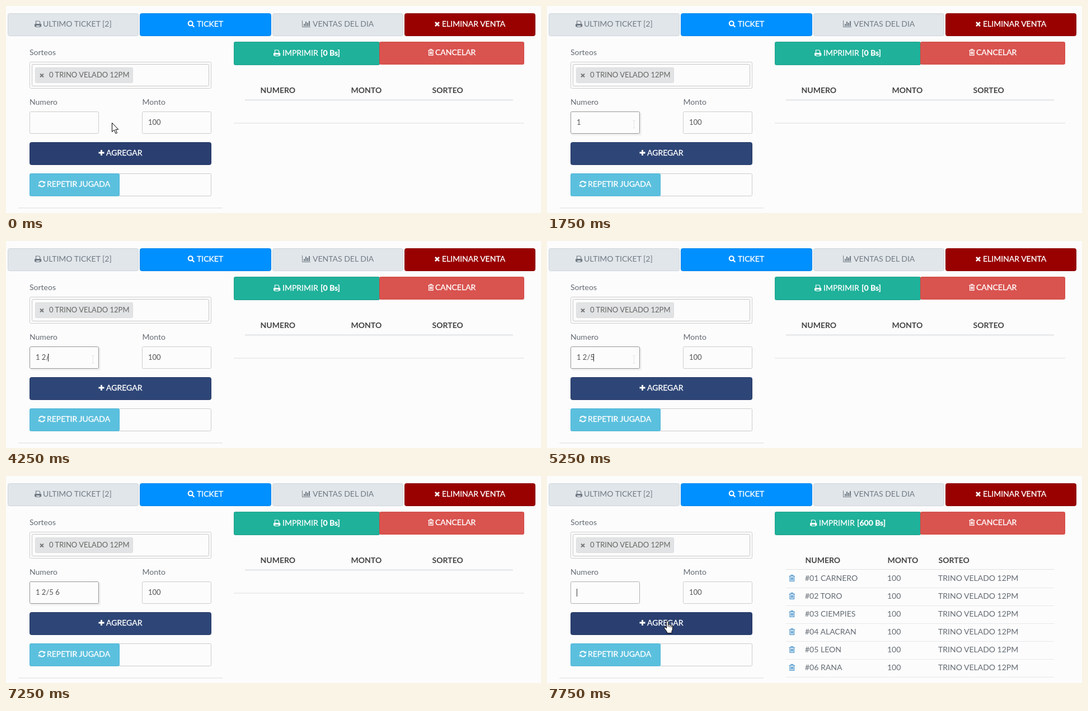
These frames come from a looping animation (956x371 px, 8000 ms). An HTML page:

```html
<!DOCTYPE html>
<html lang="es">
<head>
<meta charset="utf-8">
<title>Ventas</title>
<style>
html, body { margin: 0; height: 100%; overflow: hidden; background: #fcfcfc; }
svg { display: block; width: 100vw; height: 100vh; }
text { font: 14px Lato, sans-serif; white-space: pre; }
.b { font-weight: 700; }
.s { font-size: 13px; }
.w { fill: #fff; stroke: #fff; stroke-width: .3px; }
</style>
</head>
<body>
<svg id="stage" viewBox="0 0 956 371"></svg>
<script>
const DRAW = 'TRINO VELADO 12PM';
const GREY = '#717b85', INK = '#646b73', LINE = '#e6e8ea';

const text = (x, y, s, fill, cls = '') => `<text x="${x}" y="${y}" fill="${fill}" class="${cls}">${s}</text>`;
const white = (x, y, s, cls = '') => text(x, y, s, '#fff', 'w ' + cls);
const box = (x, y, w, h, fill, stroke, r = 3, id = '') =>
  `<rect id="${id}" x="${x + .5}" y="${y + .5}" width="${w - 1}" height="${h - 1}" rx="${r}" fill="${fill}" stroke="${stroke}"/>`;
const bar = (x, y, w, h, fill) => `<rect x="${x}" y="${y}" width="${w}" height="${h}" fill="${fill}"/>`;
const group = (id, body) => `<g id="${id}">${body}</g>`;

// Each icon: filled path, stroked path, stroke width
const ICONS = {
  print: ['M0 7.2Q0 6 1.2 6H11Q12.200 6 12.200 7.200V11H10V8.500H2.200V11H0z', 'M2.500 6V1H8L9.700 2.700V6M2.500 8.500H9.700V11.500H2.500z', 1.2],
  search: ['', 'M5.200 1.200a4 4 0 1 0 .01 0M8.200 8.200L11.800 11.800', 2.2],
  chart: ['M3 6h2v4H3zM6 2h2v8H6zM9 4h2v6H9zM12 1h2v9H12z', 'M.5 0V11.500H15', 1],
  times: ['', 'M1.500 1.500L8.500 8.500M8.500 1.500L1.500 8.500', 2.8],
  plus: ['', 'M5.500 .5V10.500M.5 5.500H10.500', 2.8],
  trash: ['', 'M0 2.500H10.500M3.500 2V.7H7V2M1.500 3V11.300H9V3M3.700 4.500V9.500M5.300 4.500V9.500M6.900 4.500V9.500', 1.2],
  refresh: ['M12.200 .5V5H7.700zM0 11.500V7H4.500z', 'M1.200 5Q2.200 1.200 6 1.200Q8.500 1.200 10.200 3.200M11 7Q10 10.800 6.200 10.800Q3.700 10.800 2 8.800', 1.9]
};
const icon = (name, x, y, color) => {
  const [fill, line, width] = ICONS[name];
  return `<g transform="translate(${x} ${y})"><path d="${fill}" fill="${color}"/>` +
    `<path d="${line}" fill="none" stroke="${color}" stroke-width="${width}"/></g>`;
};
const total = (x, amount) => icon('print', x, 78, '#fff') + white(x + 16, 89, 'IMPRIMIR') +
  white(x + 84, 89, `[${amount} Bs]`, 'b');
const heads = (...xs) => ['NUMERO', 'MONTO', 'SORTEO'].map((s, i) => text(xs[i], 156, s, '#444', 'b')).join('');

const rows = ['#01 CARNERO', '#02 TORO', '#03 CIEMPIES', '#04 ALACRAN', '#05 LEON', '#06 RANA'].map((s, i) => {
  const y = 188 + 32 * i;
  return icon('trash', 432.5, y - 11, '#4a94cc') + text(461, y, s, INK) + text(608, y, '100', INK) +
    text(699, y, DRAW, INK) + bar(427, y + 12, 479, 1, LINE);
}).join('');

const stage = document.getElementById('stage');
stage.innerHTML =
  box(3, 13, 234, 41, '#e1e6ea', '#cdd5da') + icon('print', 51, 26, GREY) + text(66, 37, 'ULTIMO TICKET [2]', GREY) +
  box(239, 13, 235, 41, '#0090ff', '#0084ea') + icon('search', 324.5, 26, '#fff') + white(341, 37, 'TICKET') +
  box(476, 13, 234, 41, '#e1e6ea', '#cdd5da') + icon('chart', 529, 26, GREY) + text(548, 37, 'VENTAS DEL DIA', GREY) +
  box(712, 13, 234, 41, '#990000', '#8a0000') + icon('times', 765.5, 27.5, '#fff') + white(779, 37, 'ELIMINAR VENTA') +

  text(42, 88, 'Sorteos', INK) + box(42, 100, 325, 48, '#fcfcfc', '#ccc', 2) + box(46, 104, 317, 40, '#fcfcfc', '#c4c4c4', 2) +
  box(52, 110, 175, 28, '#e2e3e4', '#dcddde', 2) +
  '<path d="M61 121.500l6 6m0-6l-6 6" stroke="#777" stroke-width="2"/>' +
  text(77, 128, '0 ' + DRAW, '#666', 's') +
  text(42, 177, 'Numero', INK) + text(243.5, 177, 'Monto', INK) +
  group('shadow', '<rect x="44" y="191" width="125" height="41" rx="3" fill="#f0f0f0"/>') +
  box(42, 189, 124, 40, '#fcfcfc', '#ccc', 2, 'field') +
  box(243, 189, 124, 40, '#fcfcfc', '#ccc', 2) + text(254, 213, '100', '#555', 's') +
  '<text id="typed" x="53" y="213" fill="#555" class="s"></text>' +
  '<rect id="caret" y="202" width="1" height="14" fill="#333"/>' +
  box(42, 244, 325, 41, '#2a3f70', '#263a68', 3, 'add') + icon('plus', 165, 257.5, '#fff') + white(179, 268, 'AGREGAR') +
  box(200, 300, 167, 41, '#fcfcfc', '#ccc', 2) +
  box(42, 300, 161, 41, '#5bc0de', '#4fb5d5', 2) + icon('refresh', 58, 313, '#fff') + white(73, 324, 'REPETIR JUGADA') +
  bar(22, 361, 365, 2, '#ebecee') +

  box(407, 64, 261, 42, '#1fb19a', '#1b9f8a', 2) + box(667, 64, 259, 41, '#d9534f', '#d04843', 2) +
  icon('trash', 754, 77, '#fff') + white(767, 88, 'CANCELAR') +
  group('empty', total(478, 0) + heads(454.5, 616.5, 761.5) +
    bar(427, 167, 479, 3, '#e9ebed') + bar(407, 209, 519, 2, '#ededee')) +
  group('filled', total(470, 600) + heads(461.5, 608.5, 699.5) + bar(427, 167, 479, 1, '#dfe1e3') + rows) +

  group('arrow', '<path d="M189.500 209.500V225.500L193.200 222L196 228.500L198.500 227.500L195.800 221.200H200.800z" fill="#fff" stroke="#000"/>') +
  group('beam', '<path d="M153 205.500h5M155.500 205.500v13M153 218.500h5" fill="none" stroke="#e6e6e6"/>') +
  group('hand', '<path d="M213.500 272V261.500q0-2 1.500-2t1.500 2V266.500q2.500-1 3 .8q2.200-.8 2.700.9q2-.3 2.300 1.800V274q0 2-1.500 4V281.500H214.500V279.500L210 273.500q-1.200-2 .3-2.600t3.200 2.100z' +
    'M216.500 266.500v4M219.500 267.500v3.500M222.200 268.500v3" fill="#fff" stroke="#000"/>');

// Time, field value, caret position (0 = blinked off)
const STEPS = [
  [0, '', 0], [750, '', 53], [1250, '1', 61], [1750, '1', 0], [2500, '1', 61], [2750, '1 ', 63],
  [3250, '1 2', 71], [3750, '1 2', 0], [4250, '1 2/', 75], [4750, '1 2/', 0], [5250, '1 2/5', 83],
  [5500, '1 2/5 ', 85], [6000, '1 2/5 ', 0], [6250, '1 2/5 6', 93], [6750, '1 2/5 6', 0],
  [7500, '1 2/5 6', 93], [7750, '', 53]
];
const el = id => document.getElementById(id);
const show = (id, on) => el(id).setAttribute('visibility', on ? 'visible' : 'hidden');

function render(now) {
  const t = now % 8000;
  const [, value, caret] = STEPS.findLast(step => step[0] <= t);
  const added = t >= 7750, focused = t >= 750;
  el('typed').textContent = value;
  el('caret').setAttribute('x', caret);
  show('caret', caret);
  show('shadow', focused && !added);
  el('field').setAttribute('stroke', added ? '#b0b0b0' : focused ? '#959595' : '#ccc');
  el('add').setAttribute('fill', t >= 250 && t < 7500 ? '#2e4677' : '#2a3f70');
  show('arrow', t < 250);
  show('beam', t >= 250 && t < 7250);
  show('hand', t >= 7500);
  show('empty', !added);
  show('filled', added);
  requestAnimationFrame(render);
}
render(0);
</script>
</body>
</html>
```
